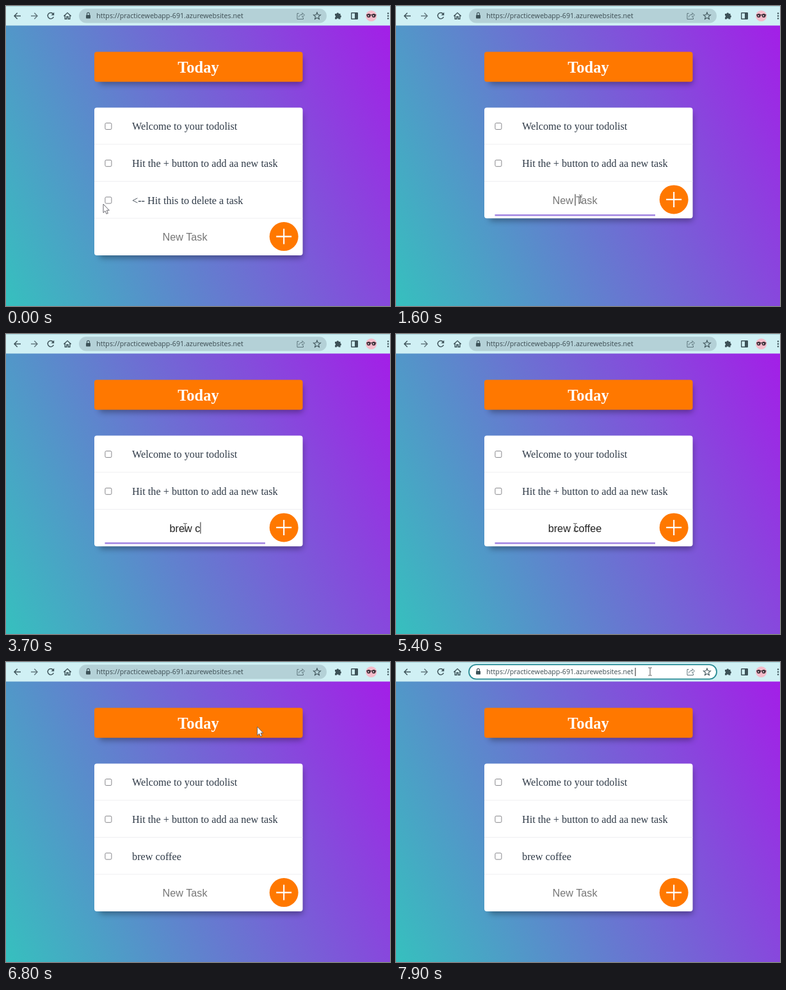
An HTML page for the animation above (8 s loop, 600 px wide and 468 px high).

```html
<!DOCTYPE html>
<html lang="en">
<head>
<meta charset="utf-8">
<title>Todo list</title>
<style>
  html, body { margin: 0; width: 100%; height: 100%; overflow: hidden; }
  svg { display: block; width: 600px; height: 468px; }
  .item { font: 16.25px "Liberation Serif", Times, serif; fill: #303b48; }
  .input { font: 16.25px "Liberation Sans", Arial, sans-serif; text-anchor: middle; }
  .title { font: bold 24.6px "Liberation Serif", Times, serif; fill: #fff; text-anchor: middle; }
  .url { font: 10.67px "Open Sans", sans-serif; fill: #3a4a50; }
  .icon { fill: none; stroke: #3d5258; stroke-width: 1.4; }
  .solid { fill: #3d5258; }
  .box { fill: #fff; stroke: #858589; stroke-width: 1; }
</style>
</head>
<body>
<svg viewBox="0 0 600 468">
  <defs>
    <linearGradient id="sky" gradientUnits="userSpaceOnUse" x1="-30" y1="403.4" x2="630" y2="95.6">
      <stop stop-color="#36c0be"/><stop offset="1" stop-color="#a31fe7"/>
    </linearGradient>
    <filter id="soft" x="-20%" y="-40%" width="140%" height="180%"><feGaussianBlur stdDeviation="5"/></filter>
  </defs>

  <rect width="600" height="468" fill="url(#sky)"/>

  <g id="toolbar">
    <rect width="600" height="30.5" fill="#d0f0f4"/>
    <rect width="600" height="1" fill="#a9d9df"/>
    <rect id="omnibox" x="114" y="4.2" width="387" height="22.4" rx="11.2" stroke-width="1.8"/>
    <path class="icon" d="M23 15.5H13M17.7 10.7L13 15.5L17.7 20.3"/>
    <path class="icon" style="stroke:#62777d" d="M39 15.5H49M44.3 10.7L49 15.5L44.3 20.3"/>
    <g id="reload">
      <path class="icon" d="M73.6 12.2A4.7 4.7 0 1 0 74.3 17"/>
      <path class="solid" d="M75.2 9.8V14.6H70.4Z"/>
    </g>
    <path id="stop" class="icon" d="M65.5 11L74.5 20M74.5 11L65.5 20"/>
    <path class="icon" d="M90.3 15.7L96 10.6L101.7 15.7M92.2 14.5V20.2H94.8V16.8H97.2V20.2H99.8V14.5"/>
    <rect class="solid" x="125" y="14" width="7" height="5.6" rx="1"/>
    <path class="icon" style="stroke-width:1.1" d="M126.5 14V12.4A2 2 0 0 1 130.500 12.4V14"/>
    <rect id="selection" x="141" y="8.5" width="232" height="14" fill="#2f7de0"/>
    <text id="url" class="url" x="141.3" y="19.300">https://practicewebapp-691.azurewebsites.net</text>
    <rect id="urlCaret" x="373.500" y="9" width="1" height="13" fill="#222"/>
    <path class="icon" style="stroke-width:1;stroke:#5c747b" d="M457.500 11.500H455V20.500H464.500V18M457.500 17.500C458 14.500 460 13.300 463 13.300V10.700L466.500 14.200L463 17.500V15.300"/>
    <path id="star" class="icon" style="stroke-width:1.1"/>
    <path class="solid" d="M514 12H516.500A1.800 1.800 0 0 1 520 12H522.500V14.500A1.800 1.800 0 0 1 522.500 18V20.500H519.800A1.600 1.600 0 0 0 516.700 20.500H514V17.700A1.600 1.600 0 0 0 514 14.700Z"/>
    <rect class="icon" x="539.700" y="10.700" width="9.600" height="9.600" rx=".6"/>
    <rect class="solid" x="545" y="10.700" width="4.300" height="9.600"/>
    <circle cx="570.700" cy="15.500" r="8.600" fill="#f5bccb"/>
    <g fill="#3a2c36"><circle cx="566.700" cy="15" r="3"/><circle cx="574.600" cy="15" r="3"/><rect x="563" y="13.300" width="15.400" height="1.200"/></g>
    <g fill="#f6e6ea"><circle cx="566.300" cy="15.300" r="1"/><circle cx="574.200" cy="15.300" r="1"/></g>
    <g class="solid"><circle cx="597" cy="11.500" r="1.200"/><circle cx="597" cy="15.500" r="1.200"/><circle cx="597" cy="19.500" r="1.200"/></g>
  </g>

  <rect x="146" y="79.500" width="317.500" height="42.500" rx="4" opacity=".34" filter="url(#soft)"/>
  <rect x="138" y="71.500" width="325.600" height="46.700" rx="4" fill="#ff7800"/>
  <text class="title" x="300.500" y="104">Today</text>

  <rect id="cardShadow" x="146" y="166.500" width="317.500" rx="4" opacity=".34" filter="url(#soft)"/>
  <rect id="card" x="138" y="158.500" width="325.600" rx="4" fill="#fff"/>
  <g id="rows"></g>

  <g id="entry">
    <rect id="underline" x="154.500" y="325.100" width="250.500" height="2.500" fill="#a183e1"/>
    <text id="field" class="input" x="279.500" y="308.500"></text>
    <rect id="caret" y="293.500" width="1" height="18" fill="#222"/>
    <circle cx="434.200" cy="301.900" r="22.500" fill="#ff7800"/>
    <path d="M422.200 301.900H446.200M434.200 289.900V313.900" stroke="#fff" stroke-width="2.100"/>
  </g>

  <path id="arrow" d="M0 0V13.500L3 10.700L5 15.300L7.300 14.300L5.300 9.800H9.300Z" fill="#fff" stroke="#56565e" stroke-width=".9"/>
  <path id="beam" d="M-2.700 -6H-.7L0 -5.400L.7 -6H2.700M0 -5.400V5.400M-2.700 6H-.7L0 5.400L.7 6H2.700" fill="none" stroke="#555" stroke-width="1"/>
</svg>

<script>
const LOOP = 8000, ROW = 57.7, TOP = 158.5, CENTER = 279.5;
const CHECK = 600, REMOVE = 1200, FOCUS = 1500, SUBMIT = 5600, ADD = 6300;
const URL_CLICK = 7150, DESELECT = 7600;
const PHRASE = "brew coffee";
const KEY_TIMES = [2600, 2850, 3050, 3250, 3450, 3650, 4000, 4200, 4350, 4450, 4650];
const POINTER = [
  [0, 152, 309], [300, 152, 309], [580, 159, 305.5], [1200, 159, 305.5],
  [1490, 288.5, 301], [2000, 288.5, 301], [2300, 280, 301.5], [6300, 280, 301.5],
  [6700, 392.7, 101], [6850, 392.7, 101], [7100, 397, 15], [LOOP, 397, 15]
];

const $ = id => document.getElementById(id);
const set = (id, attrs) => Object.entries(attrs).forEach(([k, v]) => $(id).setAttribute(k, v));
const show = (id, on) => set(id, { visibility: on ? "visible" : "hidden" });
const between = (t, a, b) => t >= a && t < b;

function starPath(cx, cy, outer, inner) {
  const points = Array.from({ length: 10 }, (_, i) => {
    const r = i % 2 ? inner : outer, a = i * Math.PI / 5 - Math.PI / 2;
    return [cx + r * Math.cos(a), cy + r * Math.sin(a)];
  });
  return `M${points.join("L")}Z`;
}

function rowMarkup(text, i, checked) {
  const y = TOP + i * ROW, mid = y + 29;
  const mark = checked
    ? `<rect x="154.500" y="${mid - 5.3}" width="10.800" height="10.800" rx="2" fill="#2463ae"/>
       <path d="M156.700 ${mid}L159 ${mid + 2.4}L163.300 ${mid - 2.5}" fill="none" stroke="#fff" stroke-width="1.500"/>`
    : `<rect class="box" x="154.900" y="${mid - 4.9}" width="10" height="10" rx="1.800"/>`;
  const strike = checked ? `<rect class="strike" x="197" y="${mid + 15.5 - 15}" width="174" height="1.300" fill="#9670d8"/>` : "";
  return `${mark}<text class="item" x="197" y="${y + 34.7}"${checked ? ' style="fill:#50505c"' : ""}>${text}</text>${strike}
    <rect x="138" y="${y + ROW - 0.9}" width="325.600" height=".9" fill="#ededf0"/>`;
}

function pointerAt(t) {
  const i = POINTER.findIndex((p, n) => n && t <= p[0]);
  const [t0, x0, y0] = POINTER[i - 1], [t1, x1, y1] = POINTER[i];
  const k = (t - t0) / (t1 - t0), e = k * k * (3 - 2 * k);
  return [x0 + (x1 - x0) * e, y0 + (y1 - y0) * e];
}

let rowsKey = "";
function drawRows(t) {
  const items = ["Welcome to your todolist", "Hit the + button to add aa new task"];
  if (t < REMOVE) items.push("&lt;-- Hit this to delete a task");
  if (t >= ADD) items.push(PHRASE);
  const checked = between(t, CHECK, REMOVE);
  const key = items.join() + checked;
  if (key !== rowsKey) {
    $("rows").innerHTML = items.map((s, i) => rowMarkup(s, i, checked && i === 2)).join("");
    rowsKey = key;
  }
  const height = (items.length + 1) * ROW - 0.3;
  set("card", { height });
  set("cardShadow", { height: height - 4 });
  set("entry", { transform: `translate(0 ${(items.length - 2) * ROW})` });
}

function drawInput(t) {
  const focused = between(t, FOCUS, ADD);
  const typed = focused ? PHRASE.slice(0, KEY_TIMES.filter(k => k <= t).length) : "";
  $("field").textContent = typed || "New Task";
  set("field", { fill: typed ? "#222" : "#777" });
  const width = typed ? $("field").getComputedTextLength() : 0;
  // A trailing space collapses in the label but still moves the caret.
  set("caret", { x: CENTER + width / 2 + (typed.endsWith(" ") ? 4.5 : 0) });
  const lastKey = Math.max(FOCUS, ...KEY_TIMES.filter(k => k <= t));
  show("caret", focused && (t - lastKey) % 1000 < 500);
  show("underline", focused);
}

function drawToolbar(t) {
  const loading = between(t, CHECK, REMOVE + 100) || between(t, SUBMIT, ADD + 100);
  show("stop", loading);
  show("reload", !loading);
  const focused = t >= URL_CLICK, selected = between(t, URL_CLICK, DESELECT);
  set("omnibox", { fill: focused ? "#fff" : "#b4d1d7", stroke: focused ? "#2b8d96" : "none" });
  show("selection", selected);
  $("url").style.fill = selected ? "#fff" : "";
  show("urlCaret", t >= DESELECT);
}

function drawPointer(t) {
  const transform = `translate(${pointerAt(t)})`;
  const beam = between(t, 1250, 6380) || t >= 7040;
  set("arrow", { transform });
  set("beam", { transform });
  show("arrow", !beam);
  show("beam", beam);
}

function render(t) {
  drawToolbar(t);
  drawRows(t);
  drawInput(t);
  drawPointer(t);
}

set("star", { d: starPath(486, 15.8, 5.8, 2.6) });
const start = performance.now();
function tick() {
  render((performance.now() - start) % LOOP);
  requestAnimationFrame(tick);
}
tick();
</script>
</body>
</html>
```
